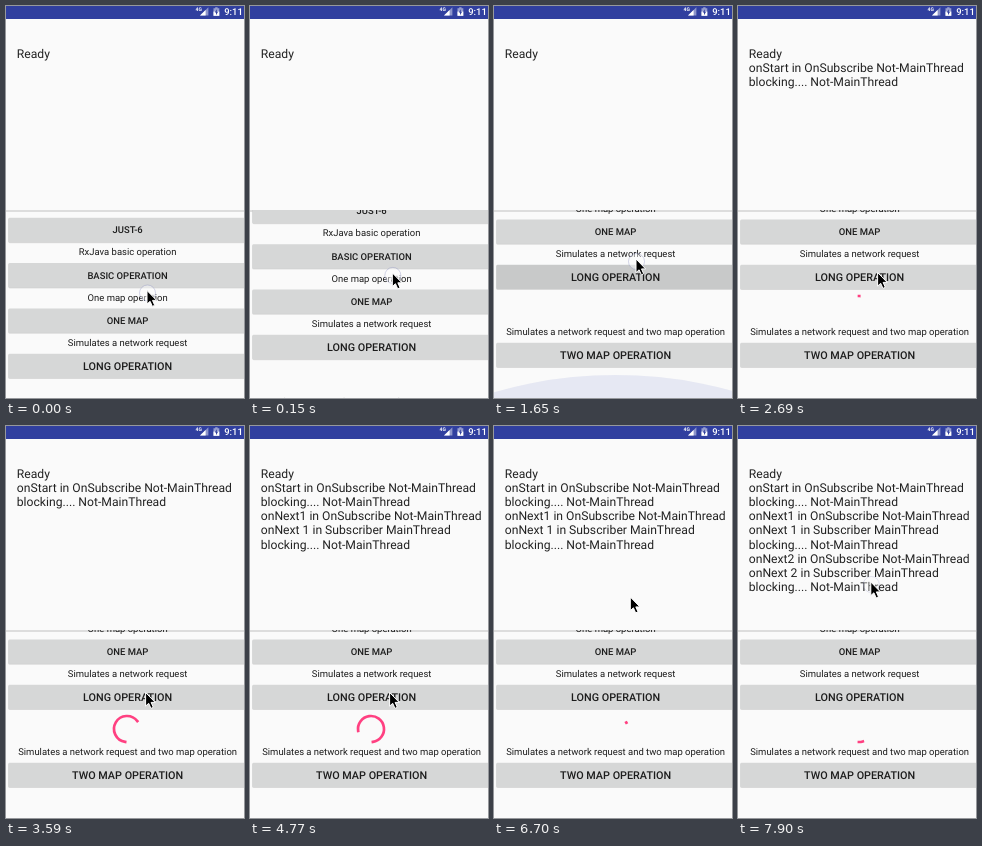
Animation of 238 by 392 pixels, one loop 8000 ms. Source, as an HTML page:

```html
<!DOCTYPE html>
<html lang="en">
<head>
<meta charset="utf-8">
<title>Operation log</title>
<style>
  html, body { margin: 0; width: 100%; height: 100%; overflow: hidden; background: #fafafa; }
  svg { display: block; width: 100vw; height: 100vh; font-family: Roboto, sans-serif; text-rendering: geometricPrecision; }
  .log { font-size: 12.16px; fill: #222; }
  .label { font-size: 9.46px; fill: #1c1c1c; text-anchor: middle; }
  .button { font-size: 9.46px; font-weight: 500; fill: #1c1c1c; text-anchor: middle; }
  .large { font-size: 10.81px; }
  .clock { font-size: 9.46px; font-weight: 500; fill: #fff; }
</style>
</head>
<body>
<svg viewBox="0 0 238 392">
  <defs>
    <clipPath id="pane"><rect y="204" width="238" height="188"/></clipPath>
  </defs>
  <rect width="238" height="392" fill="#fafafa"/>

  <g id="log"></g>

  <rect y="204.5" width="238" height="1" fill="#c2c2c2"/>
  <g clip-path="url(#pane)">
    <g id="list">
      <path id="arc" fill="none" stroke="#ff4081" stroke-width="2.7" stroke-linecap="square"/>
    </g>
    <circle id="glow" cx="121.6" r="439" fill="#3f51b5"/>
  </g>

  <rect width="238" height="13" fill="#303f9f"/>
  <text x="189.6" y="4.9" font-size="5" font-weight="700" fill="#fff">4G</text>
  <path d="M202.4 1.2V9.6H194Z" fill="#fff" opacity=".45"/>
  <path d="M199.6 4V9.6H194Z" fill="#fff"/>
  <path d="M209.2 1.2h2.4v1h1.7v7.6h-5.8V2.2h1.7Z" fill="#fff" opacity=".5"/>
  <path d="M207.5 5.6h5.8v4.2h-5.8Z" fill="#fff"/>
  <path d="M210.8 3.2l-2.1 3.4h1.3v2.6l2.1-3.4h-1.3Z" fill="#303f9f"/>
  <text class="clock" x="218.2" y="9.2">9:11</text>

  <circle id="touch" r="8" fill="#fff" fill-opacity=".55" stroke="#6a70b0" stroke-opacity=".45" stroke-width=".8"/>
  <path id="cursor" d="M0 0V13.6L3.1 10.8L5.4 15.9L7.7 14.8L5.5 9.9H9.6Z" fill="#000" stroke="#fff" stroke-width="1" stroke-linejoin="round"/>
</svg>
<script>
const LOOP = 8000, STEP = 148.85;   // the picture is held for STEP ms
const MID = 121.6, SCROLL = 89, SPIN_START = 2760;
const $ = id => document.getElementById(id);

function set(el, attrs) {
  for (const k in attrs) el.setAttribute(k, attrs[k]);
  return el;
}
function add(parent, tag, attrs, text = '') {
  const el = set(document.createElementNS('http://www.w3.org/2000/svg', tag), attrs);
  el.textContent = text;
  return parent.appendChild(el);
}

// A button with its caption above it
function addButton(y, text, caption, large) {
  const list = $('list');
  const slab = (dy, look) => add(list, 'rect', { x: 2.3, y: y - 12.2 + dy, width: 238.6, height: 24.4, rx: 1.4, ...look });
  add(list, 'text', { class: 'label', x: MID, y: y - 20.1 }, caption);
  slab(1, { opacity: .1 });
  slab(.5, { opacity: .07 });
  const face = slab(0, { fill: '#d6d7d7' });
  add(list, 'text', { class: large ? 'button large' : 'button', x: MID, y: y + (large ? 3.9 : 3.4) }, text);
  return face;
}
addButton(224, 'JUST-6', '');
addButton(269.3, 'BASIC OPERATION', 'RxJava basic operation');
addButton(314.6, 'ONE MAP', 'One map operation');
const longButton = addButton(359.9, 'LONG OPERATION', 'Simulates a network request', true);
addButton(437.9, 'TWO MAP OPERATION', 'Simulates a network request and two map operation', true);

const lines = [];
function addLine(from, text) {
  const y = 51.55 + lines.length * 14.2;
  lines.push({ from, el: add($('log'), 'text', { class: 'log', x: 10.8, y }, text) });
}
addLine(0, 'Ready');
for (let n = 0; n < 3; n++) {
  const from = 2670 + 2085 * n;
  addLine(from, `${n ? 'onNext' + n : 'onStart'} in OnSubscribe Not-MainThread`);
  if (n) addLine(from, `onNext ${n} in Subscriber MainThread`);
  addLine(from, 'blocking.... Not-MainThread');
}

const ramp = (t, from, to) => Math.min(1, Math.max(0, (t - from) / (to - from)));
const ease = (t, from, to) => {
  const f = ramp(t, from, to);
  return f * f * (3 - 2 * f);
};
const bump = (t, mid, half) => 1 - ease(Math.abs(t - mid), 0, half);

// Pointer moves: start, end, x, y reached
const moves = [
  [0, 500, 147.3, 202],
  [500, 1050, 142, 257],
  [1050, 1600, 142, 253],
  [1650, 2390, 139.6, 266.5],
  [4800, 5950, 154, 242],
  [5950, 6700, 136.3, 171],
  [6700, 7900, 132.8, 156]
];
function pointer(t) {
  let x = 141, y = 284.5;
  for (const [from, to, x2, y2] of moves) {
    const f = ease(t, from, to);
    x += (x2 - x) * f;
    y += (y2 - y) * f;
  }
  return [x, y];
}

// y at x on a cubic Bezier with the given control points
function bezier(xs, ys, x) {
  const at = (p, s) => p[0] * (1 - s) ** 3 + 3 * p[1] * s * (1 - s) ** 2 + 3 * p[2] * s * s * (1 - s) + p[3] * s ** 3;
  let lo = 0, hi = 1;
  for (let i = 0; i < 24; i++) {
    const m = (lo + hi) / 2;
    if (at(xs, m) < x) lo = m; else hi = m;
  }
  return at(ys, lo);
}
const trimStart = u => u < .5 ? 0 : bezier([.5, .7, .6, 1], [0, 0, 1, 1], u);
const trimEnd = u => u > .5 ? 1 : bezier([0, .2, .1, .5], [0, 0, 1, 1], u);

function drawSpinner(t) {
  const age = Math.max(0, t - SPIN_START), u = age / 1333 % 1;
  const turn = age * 720 / 6665 + 90 * u;
  const from = turn + 270 * trimStart(u);
  const to = Math.max(turn + 270 * trimEnd(u), from + 1);
  const point = deg => {
    const a = deg * Math.PI / 180;
    return `${121 + 13 * Math.sin(a)} ${303 + SCROLL - 13 * Math.cos(a)}`;
  };
  set($('arc'), {
    visibility: t < lines[1].from ? 'hidden' : 'visible',
    d: `M${point(from)}A13 13 0 ${to - from > 180 ? 1 : 0} 1 ${point(to)}`
  });
}

function draw(now) {
  const t = Math.floor(now % LOOP / STEP) * STEP;
  const [x, y] = pointer(t);
  const press = bump(t, 1640, 400);
  const touch = 1 - ramp(t, 550, 900) + press + .7 * ramp(t, 7600, 7850);
  set($('cursor'), { transform: `translate(${x} ${y})` });
  set($('touch'), { transform: `translate(${x + .5} ${y + 2.5})`, opacity: .8 * touch });
  set($('list'), { transform: `translate(0 ${-SCROLL * ease(t, 0, 500)})` });

  const glow = bump(t, 1640, 600);
  set($('glow'), { cy: 392 + 439 - 23 * glow, opacity: .11 * glow });
  set(longButton, { fill: press > .5 ? '#c8c9c9' : '#d6d7d7' });
  for (const { from, el } of lines) set(el, { visibility: t >= from ? 'visible' : 'hidden' });
  drawSpinner(t);
}

const origin = performance.now();
function tick() {
  draw(performance.now() - origin);
  requestAnimationFrame(tick);
}
tick();
</script>
</body>
</html>
```
